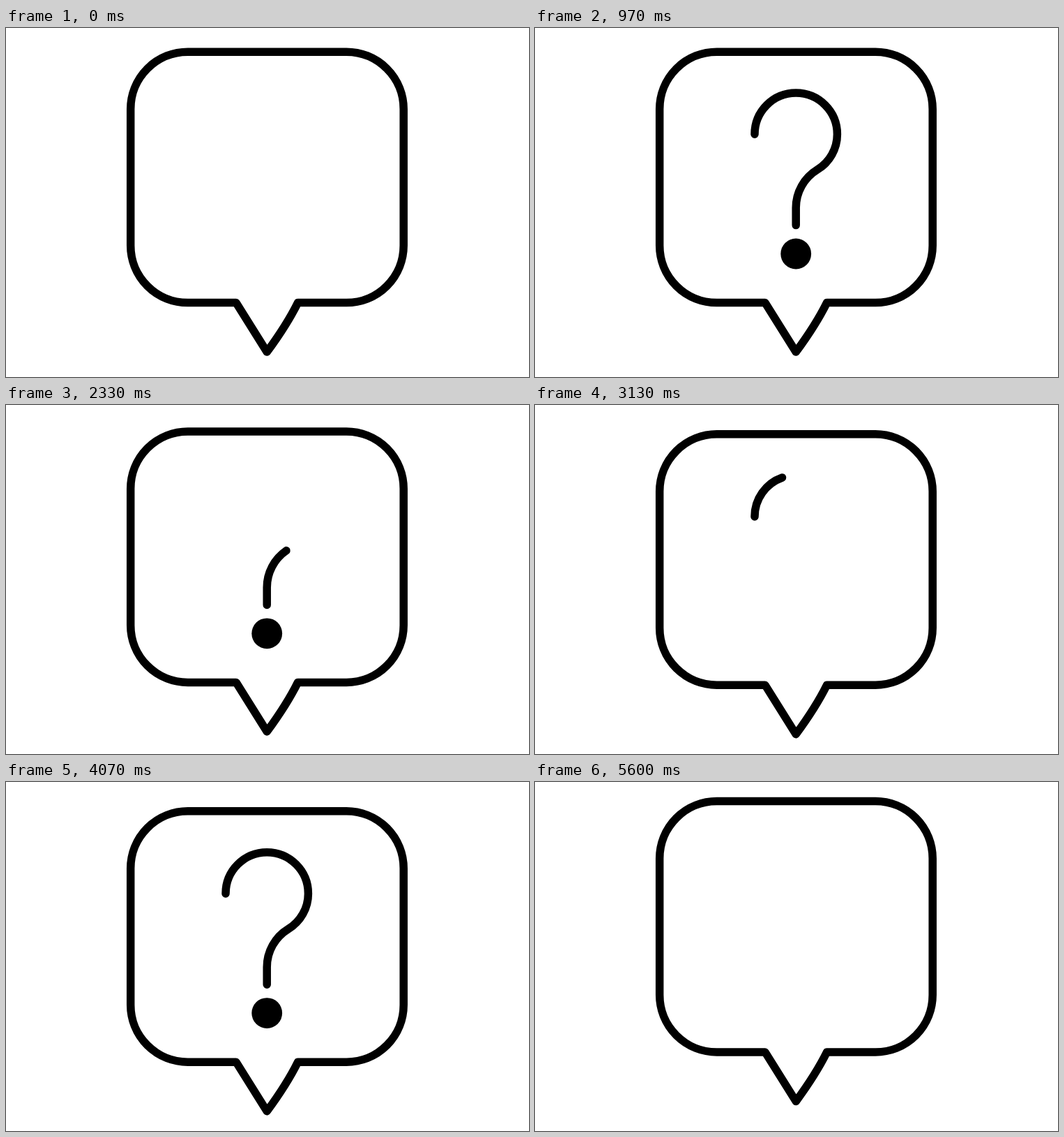
Recreate the animation shown at these times as an HTML page with a canvas. Size 750 by 500 pixels, loop 5660 ms.

```html
<!DOCTYPE html>
<html lang="en">
<head>
<meta charset="utf-8">
<title>Question bubble</title>
<style>
  html, body { margin: 0; width: 100%; height: 100%; overflow: hidden; background: #fff; }
  canvas { display: block; }
</style>
</head>
<body>
<canvas id="stage" width="750" height="500"></canvas>
<script>
const ctx = document.getElementById('stage').getContext('2d');
const LOOP = 5660;
const BOB_STEPS = 12;
const CYCLE_STEPS = 36;
const BOB_HEIGHT = 7.6;
const CENTER_X = 374.2;

// The hook: a large arc that flows into a smaller reverse arc and a stem.
const hook = { y: 152.3, r: 59.2, turn: 58.7 * Math.PI / 180, stem: 25 };
const cos = Math.cos(hook.turn);
const bendR = hook.r * cos / (1 - cos);
const bendX = CENTER_X + bendR;
const bendY = hook.y + (hook.r + bendR) * Math.sin(hook.turn);
const hookLength = hook.r * (Math.PI + hook.turn) + bendR * hook.turn + hook.stem;

const progress = (x, from, to) => Math.min(1, Math.max(0, (x - from) / (to - from)));
const ease = x => x * x * (3 - 2 * x);

// Poses are held on a 30 fps clock, 12.5 poses per second.
const stepStart = k => 10 * Math.round(Math.round(2.4 * k) * 10 / 3);

function stepAt(t) {
  let k = Math.floor(t / 80) + 1;
  while (k > 0 && stepStart(k) > t) k--;
  return k;
}

function drawBubble() {
  const left = 178.7, right = 570.2, top = 34.2, bottom = 393.6, r = 82;
  ctx.beginPath();
  ctx.moveTo(330, bottom);
  ctx.arcTo(left, bottom, left, top, r);
  ctx.arcTo(left, top, right, top, r);
  ctx.arcTo(right, top, right, bottom, r);
  ctx.arcTo(right, bottom, left, bottom, r);
  ctx.lineTo(418.5, bottom);
  ctx.quadraticCurveTo(403, 425, CENTER_X, 464.1);
  ctx.closePath();
  ctx.stroke();
}

function drawHook(from, to) {
  if (to <= from) return;
  ctx.setLineDash([(to - from) * hookLength + 0.01, 2 * hookLength]);
  ctx.lineDashOffset = -from * hookLength;
  ctx.beginPath();
  ctx.arc(CENTER_X, hook.y, hook.r, Math.PI, 2 * Math.PI + hook.turn);
  ctx.arc(bendX, bendY, bendR, Math.PI + hook.turn, Math.PI, true);
  ctx.lineTo(CENTER_X, bendY + hook.stem);
  ctx.stroke();
  ctx.setLineDash([]);
}

function drawDot(scale) {
  if (scale <= 0) return;
  ctx.beginPath();
  ctx.arc(CENTER_X, 323.5, 21.9 * scale, 0, 2 * Math.PI);
  ctx.fill();
}

function draw(t) {
  const step = stepAt(t);
  const phase = step % CYCLE_STEPS;
  const bob = BOB_HEIGHT * Math.sin(2 * Math.PI * step / BOB_STEPS);

  ctx.setTransform(1, 0, 0, 1, 0, 0);
  ctx.fillStyle = '#fff';
  ctx.fillRect(0, 0, 750, 500);
  ctx.translate(0, bob);
  ctx.fillStyle = ctx.strokeStyle = '#000';
  ctx.lineWidth = 11.5;
  ctx.lineCap = ctx.lineJoin = 'round';

  drawBubble();
  drawHook(ease(progress(phase, 23, 32)), ease(progress(phase, 0, 10)));
  drawDot(ease(progress(phase, 8, 11.5)) - ease(progress(phase, 30, 33)));
}

const start = performance.now();
function tick() {
  draw((performance.now() - start) % LOOP);
  requestAnimationFrame(tick);
}
tick();
</script>
</body>
</html>
```
